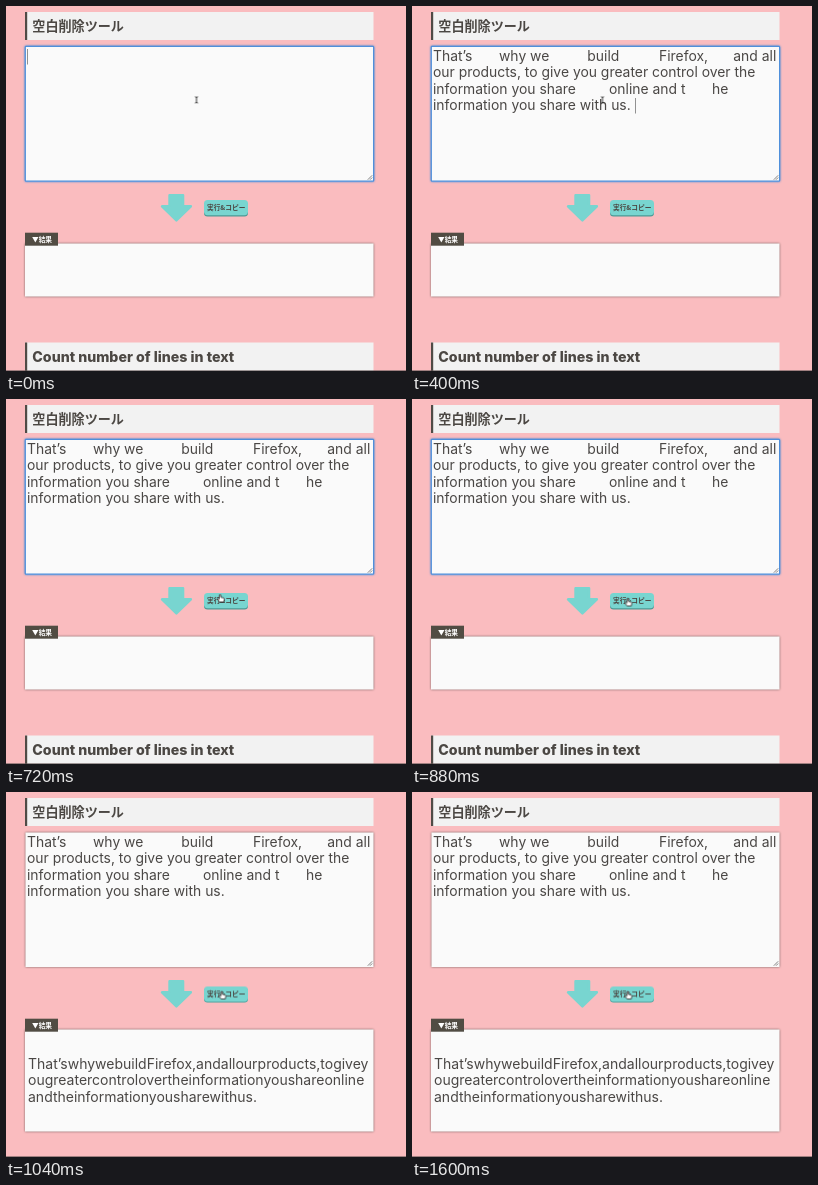
An HTML page for the animation above (1680 ms loop, 400x365 px).

```html
<!DOCTYPE html>
<html lang="ja">
<head>
<meta charset="utf-8">
<title>空白削除ツール</title>
<style>
  html, body { margin: 0; width: 100%; height: 100%; overflow: hidden; background: #fabcbf; }
  svg { display: block; width: 400px; height: 365px; }
  text { white-space: pre; }
  .body { font: 400 13.9px Inter, sans-serif; fill: #4a4745; }
  #result { font-size: 14px; }
  .title { font: 700 13.1px "Noto Sans CJK JP", "Noto Sans CJK", sans-serif; fill: #4b4743; }
  .latin { font: 800 14.2px Inter, sans-serif; fill: #4b4743; }
  .small { font: 700 6.7px "Noto Sans CJK JP", "Noto Sans CJK", sans-serif; fill: #4b4743; }
  .soft { filter: drop-shadow(0 .4px 1px rgba(70, 60, 55, .75)); }
  .glow { filter: drop-shadow(0 0 1px #6ba6ee); }
</style>
</head>
<body>
<svg viewBox="0 0 400 365">
  <rect width="400" height="365" fill="#fabcbf"/>

  <rect x="19" y="6" width="348.5" height="28" fill="#f2f2f2"/>
  <rect x="19" y="6" width="2.2" height="28" fill="#504b46"/>
  <text class="title" x="26.3" y="24.8">空白削除ツール</text>

  <rect class="soft" x="19.5" y="40.5" width="348" height="134.5" fill="#fafafa"/>
  <rect id="focus" class="glow" x="19.3" y="40.4" width="348.3" height="134.8" rx=".7" fill="#fafafa" stroke="#4f8fdb" stroke-width="1.2"/>
  <path d="M361.8 173.7l4.4-4.4M364 173.7l2.2-2.2" stroke="#666" stroke-width=".8"/>
  <g id="typed" class="body"></g>
  <rect id="caretStart" x="21" y="43" width=".8" height="15.5" fill="#777"/>
  <rect id="caretEnd" x="223.1" y="92" width=".8" height="15.5" fill="#777"/>

  <path d="M163.5 189.3h13.6v11h7.8L170.4 214.4 156 200.3h7.5z" fill="#78d5d0" stroke="#78d5d0" stroke-width="2.4" stroke-linejoin="round"/>

  <rect id="edge" x="198" y="196" width="44" height="14.6" rx="3.6" fill="#4b9995"/>
  <g id="button">
    <rect x="198" y="194" width="44" height="15.2" rx="3.6" fill="#78d5d0"/>
    <text class="small" x="201" y="204.1">実行&amp;コピー</text>
  </g>

  <rect id="boxShort" class="soft" x="19" y="237.5" width="348.5" height="53" fill="#fafafa"/>
  <rect id="boxTall" class="soft" x="19" y="237.5" width="348.5" height="102" fill="#fafafa"/>
  <rect x="19" y="226.7" width="33" height="13" fill="#514c43"/>
  <text class="small" x="26" y="235.6" style="fill:#fff">▼結果</text>
  <g id="result" class="body"></g>

  <g id="next">
    <rect x="19" y="336.5" width="348.5" height="28.5" fill="#f2f2f2"/>
    <rect x="19" y="336.5" width="2.2" height="28.5" fill="#504b46"/>
    <text class="latin" x="26.3" y="355.7">Count number of lines in text</text>
  </g>
  <rect y="364" width="400" height="1" fill="#645858" opacity=".6"/>

  <g id="cursor">
    <path id="beam" d="M-1.4-3.2Q0-3.2 0-2.3Q0-3.2 1.4-3.2M0-2.5V2.3M-1.4 3Q0 3 0 2.1Q0 3 1.4 3" fill="none" stroke="#222" stroke-width=".9"/>
    <path id="hand" d="M-1.7-3.2q0-1 .8-1t.8 1v2l2.4.5q1.2.3 1 1.5l-.5 2.7h-4.2l-2-2.7q-.3-1 .7-.9l1 .6z" fill="#fff" stroke="#222" stroke-width=".8" stroke-linejoin="round"/>
  </g>
</svg>
<script>
const LOOP = 1680;
const PASTE = 400, LEAVE = 640, HOVER = 720, PRESS = 960, DONE = 1040;
const el = id => document.getElementById(id);

function write(group, rows) {
  for (const [x, y, words] of rows) {
    const text = document.createElementNS("http://www.w3.org/2000/svg", "text");
    text.setAttribute("x", x);
    text.setAttribute("y", y);
    text.textContent = words;
    el(group).append(text);
  }
}

write("typed", [
  [21, 54.7, "That’s"], [87, 54.7, "why we"], [175.3, 54.7, "build"],
  [247, 54.7, "Firefox,"], [321.3, 54.7, "and all"],
  [21, 71.2, "our products, to give you greater control over the"],
  [21, 87.7, "information you share"], [197, 87.7, "online and t"], [300, 87.7, "he"],
  [21, 104.2, "information you share with us."]
]);
write("result", [
  [22, 276.8, "That’swhywebuildFirefox,andallourproducts,togivey"],
  [22, 293.2, "ougreatercontrolovertheinformationyoushareonline"],
  [22, 309.6, "andtheinformationyousharewithus."]
]);

// Each step is [time, value], held until the next one.
function hold(id, property, steps) {
  const frames = steps.map(([time, value]) =>
    ({ offset: time / LOOP, [property]: value, easing: "steps(1, end)" }));
  frames.push({ offset: 1, [property]: steps.at(-1)[1] });
  el(id).animate(frames, { duration: LOOP, iterations: Infinity });
}

function show(id, from, to = LOOP) {
  const steps = [[0, from === 0 ? 1 : 0]];
  if (from > 0) steps.push([from, 1]);
  if (to < LOOP) steps.push([to, 0]);
  hold(id, "opacity", steps);
}

show("caretStart", 0, PASTE);
show("caretEnd", PASTE, LEAVE);
show("typed", PASTE);
show("focus", 0, PRESS);
show("beam", 0, HOVER);
show("hand", HOVER);
show("boxShort", 0, DONE);
show("next", 0, DONE);
show("boxTall", DONE);
show("result", DONE);

hold("edge", "opacity", [[0, 1], [PRESS, 0], [DONE, 1]]);
hold("button", "transform", [
  [0, "translate(0px, 0px)"], [PRESS, "translate(0px, 1.8px)"], [DONE, "translate(0px, .5px)"]
]);
hold("cursor", "transform", [
  [0, 190.5, 94], [560, 194, 112], [640, 208, 168], [720, 215, 199.5], [800, 216.5, 203.5]
].map(([time, x, y]) => [time, `translate(${x}px, ${y}px)`]));
</script>
</body>
</html>
```
